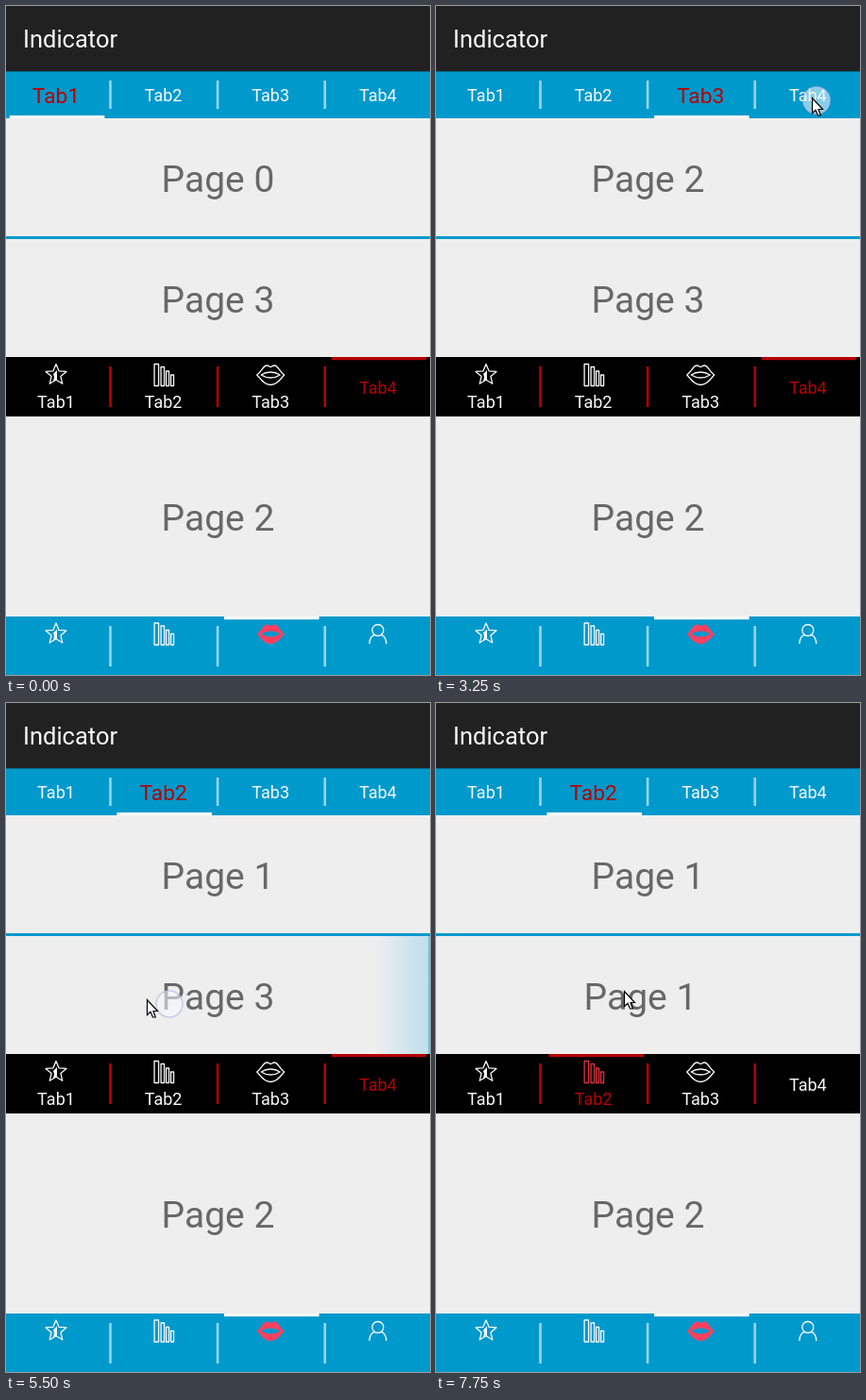
Write an HTML page with a canvas that moves like this. It is 449 by 709 pixels and loops after 8000 ms.

```html
<!DOCTYPE html>
<html lang="en">
<head>
<meta charset="utf-8">
<title>Indicator</title>
<style>
html, body { margin: 0; width: 100%; height: 100%; overflow: hidden; background: #eee; }
canvas { display: block; }
</style>
</head>
<body>
<canvas width="449" height="709"></canvas>
<script>
const ctx = document.querySelector('canvas').getContext('2d');
const W = 449, STEP = 250, STEPS = 32, CELL = 113.6;
const BLUE = '#0099cc', RED = '#b80000', PINK = '#ff4060', WHITE = '#f8f8f8', GREY = '#686868';

// Keys are [step, ...values]; values between keys are linear.
const topPos = [[5, 0], [6, .67], [7, .96], [8, 1], [9, 1], [10, 1.5], [11, 1.95], [12, 2],
  [13, 2], [14, 2.8], [15, 3], [16, 3], [17, 1.23], [18, 1]];
const midPos = [[25, 3], [26, 2.747], [27, 2.2], [28, 2], [29, 2], [30, 1.305], [31, 1.018]];
const pointer = [[1, 162, 690], [4, 325, 190], [5, 334, 160], [6, -20, 170], [7, 100, 190],
  [8, 330, 195], [9, 340, 190], [10, 60, 180], [12, 380, 105], [13, 398, 97], [15, 200, 105],
  [16, 165, 92], [18, 131, 221], [20, 320, 325], [21, 310, 320], [22, 149, 314], [23, 60, 315],
  [25, 158, 327], [26, 374, 325], [27, 400, 328], [29, 150, 320], [30, 415, 320], [31, 199, 305]];
// The touch dot trails the pointer by [dx, dy].
const touches = { 6: [36, 5], 9: [5, 3], 10: [50, 5], 13: [5, 3], 16: [5, 3], 21: [5, 3],
  22: [24, 5], 23: [20, 5], 25: [5, 3], 26: [-103, 6], 29: [5, 3], 30: [-40, 5] };
const edgeGlow = { 22: .7, 23: 1, 24: .45 };

const lipsOuter = 'M-14.5 0C-9-4-8-10-4-10C-2-10-1-8.5 0-8.5C1-8.5 2-10 4-10C8-10 9-4 14.5 0C9 6 6 10.5 0 10.5C-6 10.5-9 6-14.5 0Z';
const lipsInner = 'M-10 0C-4-4 4-4 10 0C4 4-4 4-10 0Z';
const lips = new Path2D(lipsOuter + lipsInner);
const bars = new Path2D('M-9.5 11.5V-11.5H-5V11.5ZM-2.5 11.5V-8.5H1V11.5ZM3 11.5V-4H6V11.5ZM8 11.5V0H11V11.5Z');
const person = new Path2D('M6-4A6 6 0 1 1-6-4A6 6 0 1 1 6-4ZM-9 10.5C-9 5-6 1-3 1M9 10.5C9 5 6 1 3 1');
const arrow = new Path2D('M.5.5V16.5L4 13.2L6.5 19H9.3L7 12.5H11.5Z');
const star = new Path2D(), starHalf = new Path2D('M-3-1L1-5V5L-3 7L-2 2Z');
for (let i = 0; i < 10; i++) {
  const r = i % 2 ? 5.2 : 11.5, a = (i / 5 - .5) * Math.PI;
  star.lineTo(r * Math.cos(a), r * Math.sin(a));
}
star.closePath();

function track(keys, s) {
  if (s <= keys[0][0]) return keys[0].slice(1);
  const i = keys.findIndex(k => k[0] >= s);
  if (i < 0) return keys[keys.length - 1].slice(1);
  const a = keys[i - 1], b = keys[i], f = (s - a[0]) / (b[0] - a[0]);
  return a.slice(1).map((v, j) => v + (b[j + 1] - v) * f);
}

function rect(x, y, w, h, color) {
  ctx.fillStyle = color;
  ctx.fillRect(x, y, w, h);
}

function text(str, x, y, size, color, align = 'center') {
  ctx.font = `${size}px Roboto, sans-serif`;
  ctx.textAlign = align;
  ctx.fillStyle = color;
  ctx.fillText(str, x, y);
}

function at(x, y, draw) {
  ctx.save();
  ctx.translate(x, y);
  draw();
  ctx.restore();
}

function icon(i, y, selected, color) {
  at(53 + i * CELL, y, () => {
    ctx.strokeStyle = ctx.fillStyle = color;
    ctx.lineWidth = 1.3;
    ctx.lineJoin = 'round';
    if (i === 2 && selected) {
      ctx.fillStyle = PINK;
      ctx.fill(lips, 'evenodd');
    } else ctx.stroke([star, bars, lips, person][i]);
    if (i === 0) ctx.fill(starHalf);
  });
}

function dividers(y, h, color) {
  for (let i = 0; i < 3; i++) rect(109.2 + i * CELL, y, 2.6, h, color);
}

function indicator(pos, y, color) {
  rect(3.8 + pos * CELL, y, 100.6, 3.2, color);
}

function pages(pos, baseline) {
  for (let i = 0; i < 4; i++) text('Page ' + i, 224.5 + (i - pos) * W, baseline, 39, GREY);
}

function topTabs(pos) {
  rect(0, 69, W, 50, BLUE);
  rect(0, 69, W, 1, 'rgba(0,0,0,.3)');
  dividers(79, 30, '#99d3ea');
  const active = Math.round(pos);
  for (let i = 0; i < 4; i++) {
    const on = i === active;
    text('Tab' + (i + 1), 53 + i * CELL, on ? 102.5 : 101, on ? 22.8 : 18, on ? RED : WHITE);
  }
  indicator(pos, 116, WHITE);
}

function middleTabs(pos) {
  rect(0, 372, W, 63, '#000');
  dividers(382, 43, RED);
  const active = Math.round(pos);
  for (let i = 0; i < 4; i++) {
    const color = i === active ? RED : WHITE;
    text('Tab' + (i + 1), 53 + i * CELL, i < 3 ? 426 : 411, 18, color);
    if (i < 3) icon(i, 391, i === active, i === active ? '#e0303c' : WHITE);
  }
  indicator(pos, 372, RED);
}

function bottomTabs() {
  rect(0, 647, W, 62, BLUE);
  dividers(657, 43, '#99d3ea');
  for (let i = 0; i < 4; i++) icon(i, 665.5, i === 2, WHITE);
  indicator(2, 647, WHITE);
}

function glow(strength) {
  const g = ctx.createLinearGradient(392, 0, W, 0);
  g.addColorStop(0, 'rgba(51,181,229,0)');
  g.addColorStop(1, `rgba(51,181,229,${.38 * strength})`);
  rect(392, 247, 57, 125, g);
  rect(447, 247, 2, 125, `rgba(0,153,204,${.5 * strength})`);
}

function drawPointer(step) {
  const [x, y] = track(pointer, step), lag = touches[step];
  if (lag) {
    ctx.beginPath();
    ctx.arc(x + lag[0], y + lag[1], 14, 0, 7);
    ctx.fillStyle = 'rgba(248,250,255,.55)';
    ctx.fill();
    ctx.strokeStyle = 'rgba(190,190,228,.75)';
    ctx.lineWidth = 1.6;
    ctx.stroke();
  }
  at(x, y, () => {
    ctx.fillStyle = '#fff';
    ctx.fill(arrow);
    ctx.strokeStyle = '#000';
    ctx.lineWidth = 1.2;
    ctx.stroke(arrow);
  });
}

function frame(now) {
  const step = Math.floor(now / STEP) % STEPS;
  const [top] = track(topPos, step), [mid] = track(midPos, step);
  rect(0, 0, W, 709, '#eee');
  rect(0, 0, W, 69, '#212121');
  text('Indicator', 18, 43.5, 25.5, WHITE, 'left');
  topTabs(top);
  pages(top, 196.5);
  rect(0, 244, W, 3, BLUE);
  pages(mid, 324.5);
  if (edgeGlow[step]) glow(edgeGlow[step]);
  middleTabs(mid);
  pages(2, 556);
  bottomTabs();
  if (step > 0) drawPointer(step);
  requestAnimationFrame(frame);
}
requestAnimationFrame(frame);
</script>
</body>
</html>
```
